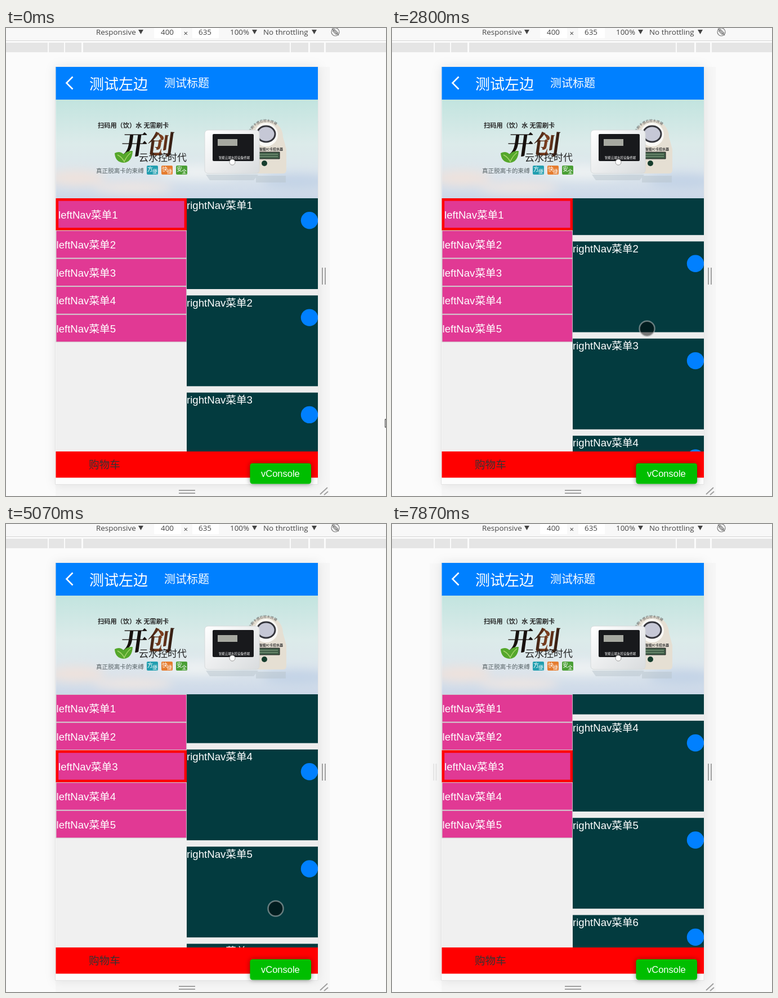
Write an HTML page that moves like this. It is 675 px wide and 830 px high and loops after 8270 ms.

```html
<!DOCTYPE html>
<html lang="zh">
<head>
<meta charset="utf-8">
<style>
html, body { margin: 0; width: 100%; height: 100%; overflow: hidden; background: #fbfbfb; }
svg { display: block; width: 675px; height: 830px; }
text { font: 18.63px "Liberation Sans", "Noto Sans CJK SC", "Noto Sans CJK", sans-serif; }
.white { fill: #fff; }
.bar { font: 13.4px "Open Sans", "Noto Sans", sans-serif; fill: #444; }
.serif { font-family: "Noto Serif CJK SC", "Noto Serif", serif; }
</style>
</head>
<body>
<svg viewBox="0 0 675 830">
  <defs>
    <linearGradient id="sky" x2="0" y2="1">
      <stop stop-color="#c2e4df"/><stop offset=".45" stop-color="#dcebea"/>
      <stop offset=".75" stop-color="#dce5ec"/><stop offset="1" stop-color="#ccd8e8"/>
    </linearGradient>
    <linearGradient id="ink"><stop offset=".45" stop-color="#17110e"/><stop offset=".75" stop-color="#80401f"/><stop offset="1" stop-color="#20140f"/></linearGradient>
    <linearGradient id="shell" x2="1" y2="1"><stop stop-color="#fff"/><stop offset="1" stop-color="#d9dcde"/></linearGradient>
    <filter id="blur" x="-50%" y="-100%" width="200%" height="300%"><feGaussianBlur stdDeviation="9"/></filter>
    <filter id="shade" x="-30%" y="-50%" width="160%" height="200%"><feDropShadow dx="0" dy="0" stdDeviation="4" flood-opacity=".45"/></filter>
    <filter id="halo"><feDropShadow dx="0" dy="0" stdDeviation="9" flood-opacity=".09"/></filter>
    <clipPath id="pane"><path d="M321 302H554V751H321z"/></clipPath>
    <clipPath id="photo"><path d="M88.500 127H554V302H88.500z"/></clipPath>
    <path id="arc" d="M434 203A29 29 0 1 1 490 203"/>
  </defs>

  <!-- toolbar and ruler -->
  <path fill="#f8f8f8" d="M0 0H675V22H0z"/>
  <path stroke="#d4d4d4" d="M0 22.500H675"/>
  <path fill="#fff" d="M263 0H311V18H263zM331 0H378V18H331z"/>
  <g class="bar">
    <text class="bar" x="160" y="12">Responsive</text>
    <text class="bar" x="275" y="12">400</text><text class="bar" x="315.500" y="14">×</text>
    <text class="bar" x="342" y="12">635</text><text class="bar" x="398" y="12">100%</text>
    <text class="bar" x="457" y="12">No throttling</text>
    <path d="M235 3h9l-4.500 8zM437 3h9l-4.500 8zM543 3h9l-4.500 8z"/>
  </g>
  <g fill="none" stroke="#777" stroke-width="1.200"><circle cx="585" cy="7" r="7"/><path d="M580.500 5.500l3-3 6 6-3 3zM579 1l12 12"/></g>
  <path fill="#e5e5e5" d="M0 26H74V43H0zM76 26H103V43H76zM105 26H134V43H105zM137 26H504V43H137zM506 26H537V43H506zM540 26H565V43H540zM568 26H675V43H568z"/>

  <!-- device frame -->
  <path fill="#f6f6f6" d="M554 69H575V810H554zM88 810H575V830H88z"/>
  <path id="edge" fill="#f8f8f8" d="M67 70H88V810H67z"/>
  <path id="grip" stroke="#e6e6e6" stroke-width="2" d="M74 425V455M78.500 425V455"/>
  <path fill="#fcfcfc" stroke="#e2e2e2" filter="url(#halo)" d="M87.500 69H554V809.500H87.500z"/>
  <path stroke="#a0a0a0" stroke-width="2" d="M562 425V455M567 425V455M307 820H336M307 825H336M558 827L571 815M565 828L572 822"/>
  <path fill="#f0f0f0" d="M88.500 302H321V751H88.500z"/>
  <path fill="#ededed" d="M321 302H554V751H321z"/>

  <!-- header -->
  <path fill="#0080ff" d="M88.500 69H554V127.500H88.500z"/>
  <path fill="none" stroke="#fff" stroke-width="2.600" d="M118.500 86.500L107.500 97.500L118.500 108.500"/>
  <text class="white" x="148" y="108.500" style="font-size:26px">测试左边</text>
  <text class="white" x="281" y="105" style="font-size:20px">测试标题</text>

  <!-- banner -->
  <g clip-path="url(#photo)">
    <path fill="url(#sky)" d="M88 127H554V302H88z"/>
    <g filter="url(#blur)">
      <ellipse cx="125" cy="266" rx="50" ry="13" fill="#efe2dc"/>
      <ellipse cx="225" cy="283" rx="70" ry="10" fill="#efe6e2"/>
      <ellipse cx="340" cy="255" rx="70" ry="12" fill="#eef2f3"/>
      <ellipse cx="515" cy="272" rx="60" ry="14" fill="#c3d3e6"/>
    </g>
    <text x="163" y="177" fill="#282828" style="font-size:11.200px;font-weight:bold">扫码用（饮）水 无需刷卡</text>
    <text class="serif" x="0" y="0" fill="url(#ink)" transform="translate(202 224) skewX(-8)" style="font-size:47px;font-weight:900">开创</text>
    <text x="236" y="236" fill="#222" style="font-size:17px;font-weight:500">云水控时代</text>
    <path fill="#55a72b" d="M193 222Q202 217 209 224Q215 217 225 218Q224 238 209 239Q194 238 193 222"/>
    <path fill="none" stroke="#a7d56c" stroke-width="1.500" d="M198 225Q206 229 210 237Q215 226 222 221"/>
    <text x="160" y="257" fill="#596468" style="font-size:10.600px">真正脱离卡的束缚</text>
    <g id="badges"></g>
    <!-- appliances -->
    <path fill="#b9c5cd" opacity=".5" d="M355 260H448L440 270H362zM444 262H497V274H444z"/>
    <path fill="#e5dfd3" d="M432 193A30 30 0 0 1 492 193L498 215V252Q498 258 492 258H440Q434 258 434 252z"/>
    <circle cx="462" cy="189" r="21" fill="#faf9f5"/>
    <ellipse cx="462" cy="188" rx="16" ry="14" fill="#c6c8d6" stroke="#35363d" stroke-width="3"/>
    <text fill="#555" style="font-size:6px"><textPath href="#arc">电子智能刷卡感应控水终端</textPath></text>
    <text x="450" y="217" fill="#333" style="font-size:6px;font-weight:bold">智能IC卡控水器</text>
    <path fill="#3e5b46" stroke="#222" d="M447 220H486V232H447z"/>
    <path stroke="#8fae8e" d="M450 224H483M450 228H483"/>
    <circle cx="459" cy="240" r="5" fill="#173d2d"/>
    <rect x="353" y="181" width="97" height="77" rx="6" fill="url(#shell)" stroke="#d5d9da"/>
    <rect x="367" y="188" width="73" height="48" rx="2" fill="#18191c"/>
    <path fill="#a7a9a1" d="M376 197H411V209H376z"/>
    <text class="white" x="378" y="232" style="font-size:5.500px">智能云端水控设备终端</text>
    <circle cx="402" cy="238" r="5" fill="#fff" stroke="#999"/>
  </g>

  <g id="left"></g>
  <g clip-path="url(#pane)"><g id="right"></g></g>

  <!-- cart bar -->
  <path fill="#f00" d="M88.500 751H554V797.500H88.500z"/>
  <text x="147" y="781" fill="#333">购物车</text>
  <rect x="433.500" y="772" width="108.500" height="36.500" rx="4.500" fill="#04be02" filter="url(#shade)"/>
  <text class="white" x="453" y="795.500" style="font-size:16.500px">vConsole</text>

  <circle id="ball" r="12.500" fill="#58a044"/>
  <circle id="touch" r="13.500" fill="#000" fill-opacity=".5" stroke="#ccc" stroke-opacity=".5" stroke-width="2.500"/>
  <rect id="mouse" width="10" height="14" fill="#fff" stroke="#222"/>
</svg>
<script>
const $ = id => document.getElementById(id);
const LOOP = 8270, TOP = 302, PITCH = 172.3, FLIGHT = 1000;
const CART = { x: 166, y: 738 };

// [time, x, y]
const pointer = [
  [0, 682, 701], [70, 682, 701], [400, 600, 480], [650, 528, 338], [730, 538, 336], [870, 538, 336],
  [1200, 553, 481], [1670, 540, 531], [2200, 480, 610], [2570, 465, 629], [2800, 453, 534],
  [2950, 460, 414], [3330, 502, 461], [3870, 502, 461], [3960, 539, 436], [4250, 539, 436],
  [5000, 479, 682], [5100, 479, 682], [5350, 485, 631], [5600, 520, 708], [5700, 537, 722],
  [6470, 536, 720], [6700, 320, 686], [7000, 99, 772], [7270, 196, 745], [7500, 90, 600], [7600, 72, 500], [LOOP, 72, 440]
];
// [time, offset]
const scroll = [
  [0, 0], [2570, 0], [2800, 95], [2950, 215], [3050, 295], [3180, 362], [3330, 402],
  [3500, 412], [3730, 419], [5100, 419], [5350, 466], [5500, 470], [LOOP, 470]
];
// [launch time, start height]
const throws = [[800, 341], [3950, 439], [5700, 732]];

function at(keys, t) {
  const i = Math.max(1, keys.findIndex(k => k[0] >= t));
  const a = keys[i - 1], b = keys[i], f = (t - a[0]) / (b[0] - a[0]);
  return a.slice(1).map((v, n) => v + (b[n + 1] - v) * f);
}

function place(el, x, y, shown) {
  el.setAttribute('transform', `translate(${x} ${y})`);
  el.style.display = shown ? '' : 'none';
}

function drawLeft(active) {
  let y = TOP, out = '';
  for (let i = 0; i < 5; i++) {
    const on = i === active, h = on ? 56.9 : 49.6, b = on ? 4.6 : 1;
    out += `<rect x="${88.5 + b / 2}" y="${y + b / 2}" width="${232.7 - b}" height="${h - b}"
      fill="#e13994" stroke="${on ? '#f00' : '#ccc'}" stroke-width="${b}"/>
      <text class="white" x="${88.5 + b}" y="${y + h / 2 + 7.5}">leftNav菜单${i + 1}</text>`;
    y += h;
  }
  $('left').innerHTML = out;
}

$('right').innerHTML = [0, 1, 2, 3, 4, 5].map(i => {
  const y = TOP + i * PITCH;
  return `<rect x="321" y="${y}" width="233" height="161" fill="#033b3f"/>
    <text class="white" x="321" y="${y + 19.3}">rightNav菜单${i + 1}</text>
    <circle cx="539" cy="${y + 39.3}" r="15.200" fill="#0080ff"/>`;
}).join('');

$('badges').innerHTML = [['方便', '#239fb0'], ['快捷', '#e57d30'], ['安全', '#4a9f35']].map(([s, c], i) =>
  `<rect x="${250 + 26 * i}" y="244" width="20" height="16" rx="2" fill="${c}"/>
   <text class="white" x="${251 + 26 * i}" y="254" style="font-size:10px">${s[0]}</text>
   <text class="white" x="${260 + 26 * i}" y="258" style="font-size:9px">${s[1]}</text>`).join('');

let current = -1;
function render(t) {
  const [offset] = at(scroll, t);
  $('right').setAttribute('transform', `translate(0 ${-offset})`);
  const active = Math.floor(offset / PITCH);
  if (active !== current) drawLeft(current = active);

  const toss = throws.find(([s]) => t >= s && t < s + FLIGHT);
  if (toss) {
    const p = 1 - (1 - (t - toss[0]) / FLIGHT) ** 1.67;
    place($('ball'), 539 + (CART.x - 539) * p, toss[1] + (CART.y - toss[1]) * p ** 1.487, true);
  } else place($('ball'), 0, 0, false);

  const [x, y] = at(pointer, t);
  place($('touch'), x, y, x < 570 && x > 88);
  place($('mouse'), x - 8.5, y - 7, x >= 570);
  $('edge').style.display = $('grip').style.display = t > 7500 ? '' : 'none';
}

const start = performance.now();
function tick() {
  render((performance.now() - start) % LOOP);
  requestAnimationFrame(tick);
}
tick();
</script>
</body>
</html>
```
